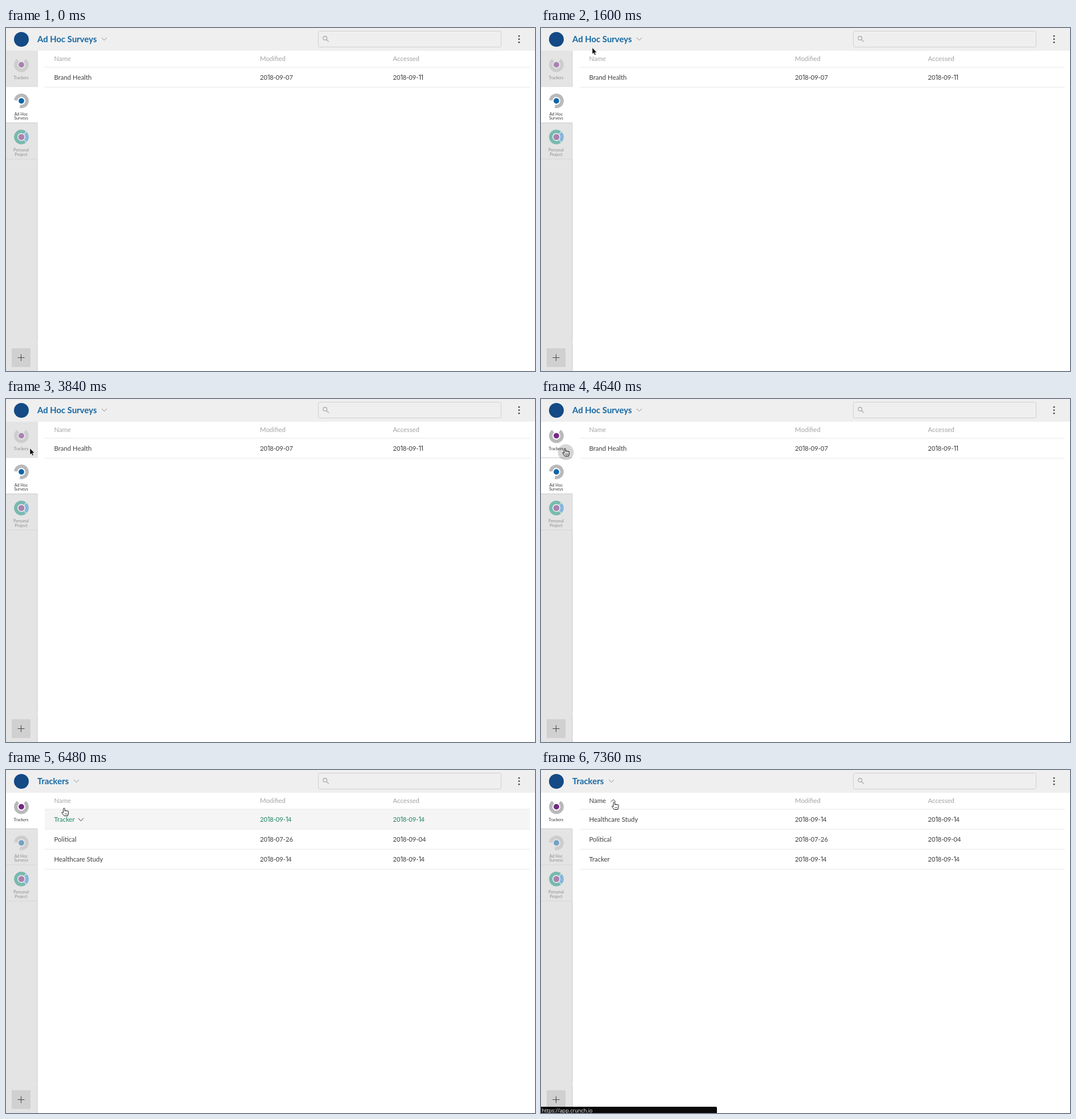
Recreate the animation shown at these times as an HTML page. Size 929 px wide and 603 px high, loop 8000 ms.

```html
<!DOCTYPE html>
<html lang="en">
<head>
<meta charset="utf-8">
<title>Project list</title>
<style>
  html, body { margin: 0; width: 100%; height: 100%; overflow: hidden; background: #fff; }
  svg { display: block; width: 929px; height: 603px; }
  text { font: 11.4px Lato, sans-serif; fill: #3d3d3d; }
  .title { font-size: 14.9px; font-weight: 700; fill: #1467a3; }
  .head { fill: #a4a4a4; }
  .date { font-size: 11.2px; }
  .green { fill: #1f8460; }
  .label { font-size: 7.2px; text-anchor: middle; fill: #3d3d3d; }
  .one { font-family: Inter, sans-serif; letter-spacing: -.4px; }
  .url { font: 9.1px "Open Sans", sans-serif; fill: #fff; }
  .line { fill: none; stroke: #e7e7e7; }
  .chevron { fill: none; stroke: #8c8c8c; stroke-width: 1; }
  .dark { stroke: #3d3d3d; }
</style>
</head>
<body>
<svg id="stage" viewBox="0 0 929 603"></svg>
<script>
const LOOP = 8000, STEP = 80;
const HOVER = 4480, SWITCH = 5200, LOADED = 5600, SORTED = 7360;
const PITCH = 35.15;

// A group visible only between two times
const during = (from, to, content) =>
  `<g data-from="${from}" data-to="${to}">${content}</g>`;

const text = (x, y, str, cls = '') => `<text x="${x}" y="${y}" class="${cls}">${str}</text>`;
const date = (x, y, str, cls) =>
  text(x, y, str.replace(/1/g, '<tspan class="one">1</tspan>'), 'date ' + cls);
const chevron = (x, y, dy = 4.5, cls = '') =>
  `<path class="chevron ${cls}" d="M${x - 4.5} ${y - dy / 2}l4.5 ${dy} 4.5 ${-dy}"/>`;
const rule = i => `<path class="line" d="M68 ${69 + PITCH * i}H920"/>`;

function row(i, name, modified, accessed, cls = '') {
  const y = 91 + PITCH * i;
  return text(84.5, y, name, cls) + date(446, y, modified, cls) + date(679.5, y, accessed, cls);
}

const nameHead = cls => text(84.5, 58.3, 'Name', cls);
const dateHeads = text(446, 58.3, 'Modified', 'head') + text(679.5, 58.3, 'Accessed', 'head');

// Ring segment around 0,0; degrees clockwise from the top
function arc(from, to, color) {
  const r = 9.9;
  const at = deg => {
    const a = deg * Math.PI / 180;
    return `${(r * Math.sin(a)).toFixed(2)} ${(-r * Math.cos(a)).toFixed(2)}`;
  };
  const large = to - from > 180 ? 1 : 0;
  return `<path d="M${at(from)}A${r} ${r} 0 ${large} 1 ${at(to)}" fill="none" stroke="${color}" stroke-width="6"/>`;
}
const dot = (color, r = 4.9) => `<circle r="${r}" fill="${color}"/>`;

const projects = [
  { top: 40, lines: ['Trackers'], icon: arc(36, 324, '#b9b9bb') + dot('#752a84') },
  { top: 103.5, lines: ['Ad Hoc', 'Surveys'], icon: arc(-85, 195, '#b9b9bb') + dot('#0f66a8') },
  { top: 167, lines: ['Personal', 'Project'],
    icon: dot('#fff', 12) + arc(140, 400, '#16957f') + arc(46, 134, '#2d8fd0') + dot('#752a84', 5.4) }
];

function cell({ top, lines, icon }, active) {
  const labels = lines.map((s, i) => text(26.5, top + 50.2 + 7.5 * i, s, 'label')).join('');
  return `<rect y="${top}" width="${active ? 56 : 54.5}" height="63.5" fill="${active ? '#fff' : '#e4e4e4'}"/>` +
    `<path d="M0 ${top + 63.3}H55" stroke="${active ? '#c9c9c9' : '#d6d6d6'}"/>` +
    `<g opacity="${active ? 1 : .52}"><g transform="translate(27 ${top + 24.6})">${icon}</g>${labels}</g>`;
}

const menuDots = [14.2, 19.7, 25.2].map(y => `<circle cx="901" cy="${y}" r="1.4" fill="#444"/>`).join('');

const frame = `
  <rect width="929" height="603" fill="#fff"/>
  <rect width="929" height="40" fill="#efefef"/>
  <rect y="40" width="55" height="563" fill="#e4e4e4"/>
  <path d="M55 40V552M55 553.5V603" stroke="#c9c9c9"/>
  <circle cx="27" cy="20" r="13" fill="#144a85"/>
  <rect x="548.5" y="5.5" width="321" height="28" rx="3" fill="#efefef" stroke="#cfcfcf"/>
  <g fill="none" stroke="#acacac" stroke-width="1.3"><circle cx="560.3" cy="17.8" r="3.3"/><path d="M562.8 20.3l4 4"/></g>
  ${menuDots}
  <rect x="10" y="563" width="33" height="33" fill="#d0d0d0"/>
  <path d="M20.5 579.5H32.5M26.5 573.5V585.5" stroke="#444"/>`;

const [trackers, adHoc, personal] = projects;
const sidebar = cell(personal, false) +
  during(0, HOVER, cell(trackers, false)) + during(0, SWITCH, cell(adHoc, true)) +
  during(SWITCH, LOOP, cell(adHoc, false)) + during(HOVER, LOOP, cell(trackers, true));

const surveys = text(55, 25, 'Ad Hoc Surveys', 'title') + chevron(172.5, 19.3) +
  nameHead('head') + dateHeads + rule(0) + rule(1) +
  row(0, 'Brand Health', '2018-09-07', '2018-09-11');

const study = ['Healthcare Study', '2018-09-14', '2018-09-14'];
const tracker = ['Tracker', '2018-09-14', '2018-09-14'];

const trackerList =
  during(6320, 6560, '<rect x="68" y="69" width="852" height="35" fill="#f5f5f5"/>' +
    row(0, ...tracker, 'green') + chevron(131.5, 87.2, 5, 'dark')) +
  during(LOADED, 6320, row(0, ...tracker)) +
  during(6560, SORTED, row(0, ...tracker)) +
  during(LOADED, SORTED, row(2, ...study)) +
  during(SORTED, LOOP, row(0, ...study) + row(2, ...tracker) + chevron(127, 54, -4, 'dark')) +
  during(LOADED, 6560, nameHead('head')) +
  during(6560, LOOP, nameHead('')) +
  during(LOADED, LOOP, dateHeads + [0, 1, 2, 3].map(rule).join('') +
    row(1, 'Political', '2018-07-26', '2018-09-04'));

const statusBar = '<path d="M0 592H307a2 2 0 0 1 2 2V603H0Z" fill="#0a0a0a"/>' +
  text(1.5, 601.8, 'https://app.crunch.io', 'url');

const arrow = '<path d="M0 -.5V11L2.6 8.7 4.3 12.6 6.3 11.8 4.6 8H8.2Z" fill="#000" stroke="#fff" stroke-width=".7"/>';
const hand = `<g stroke="#111" stroke-width=".95" stroke-linejoin="round">
  <path fill="#fff" d="M-1.3 8.3V1.4a1.3 1.3 0 0 1 2.6 0V5.2a1.1 1.1 0 0 1 2.2.2a1.1 1.1 0 0 1 2.2.4a1 1 0 0 1 2 .6V9.2L6.5 13.5H0L-3.8 8.7c-.8-1.5.9-2.1 1.6-1.3Z"/>
  <path fill="none" stroke-width=".6" d="M1.6 9V11.5M3.4 9V11.5M5.2 9V11.5"/></g>`;
const pulse = (x, y) => `<circle cx="${x}" cy="${y}" r="14" fill="#000" opacity=".16"/>`;

const pointer =
  during(480, HOVER, arrow) + during(HOVER, LOOP, hand) +
  during(4000, 4160, pulse(3.5, 5.5)) +
  during(4640, 4800, pulse(1.5, 6.5)) +
  during(7200, SORTED, pulse(1.5, 6.5));

const stage = document.getElementById('stage');
stage.innerHTML = frame + sidebar + during(0, SWITCH, surveys) +
  during(SWITCH, LOOP, text(55, 25, 'Trackers', 'title') + chevron(123.5, 19.3)) +
  trackerList + during(6800, LOOP, statusBar) + `<g id="pointer">${pointer}</g>`;

// Pointer path: time, x, y
const path = [
  [480, 546, 588], [560, 392, 390], [640, 240, 208], [720, 164, 117], [880, 164, 117],
  [1120, 82, 62], [1280, 43, 36], [1360, 43, 36], [1600, 90, 35], [1840, 129, 33],
  [2000, 140, 33], [2240, 140, 33], [2400, 104, 72], [2640, 52, 136], [2960, 50, 148],
  [3360, 50, 148], [3600, 46, 112], [3840, 42, 87], [6160, 42, 87], [6480, 102, 67],
  [6800, 120, 58], [7040, 128.5, 56], [LOOP, 128.5, 56]
];

function pointerAt(t) {
  const i = path.findIndex(p => p[0] > t);
  if (i < 1) return path[0].slice(1);
  const [t0, x0, y0] = path[i - 1], [t1, x1, y1] = path[i];
  const k = (t - t0) / (t1 - t0);
  return [x0 + (x1 - x0) * k, y0 + (y1 - y0) * k];
}

const timed = [...stage.querySelectorAll('[data-from]')];
const pointerGroup = document.getElementById('pointer');
const start = performance.now();

function render() {
  const elapsed = Math.max(0, performance.now() - start) % LOOP;
  const t = Math.floor(elapsed / STEP) * STEP;
  for (const g of timed) {
    g.style.display = t >= +g.dataset.from && t < +g.dataset.to ? '' : 'none';
  }
  pointerGroup.setAttribute('transform', `translate(${pointerAt(t)})`);
  requestAnimationFrame(render);
}
render();
</script>
</body>
</html>
```
